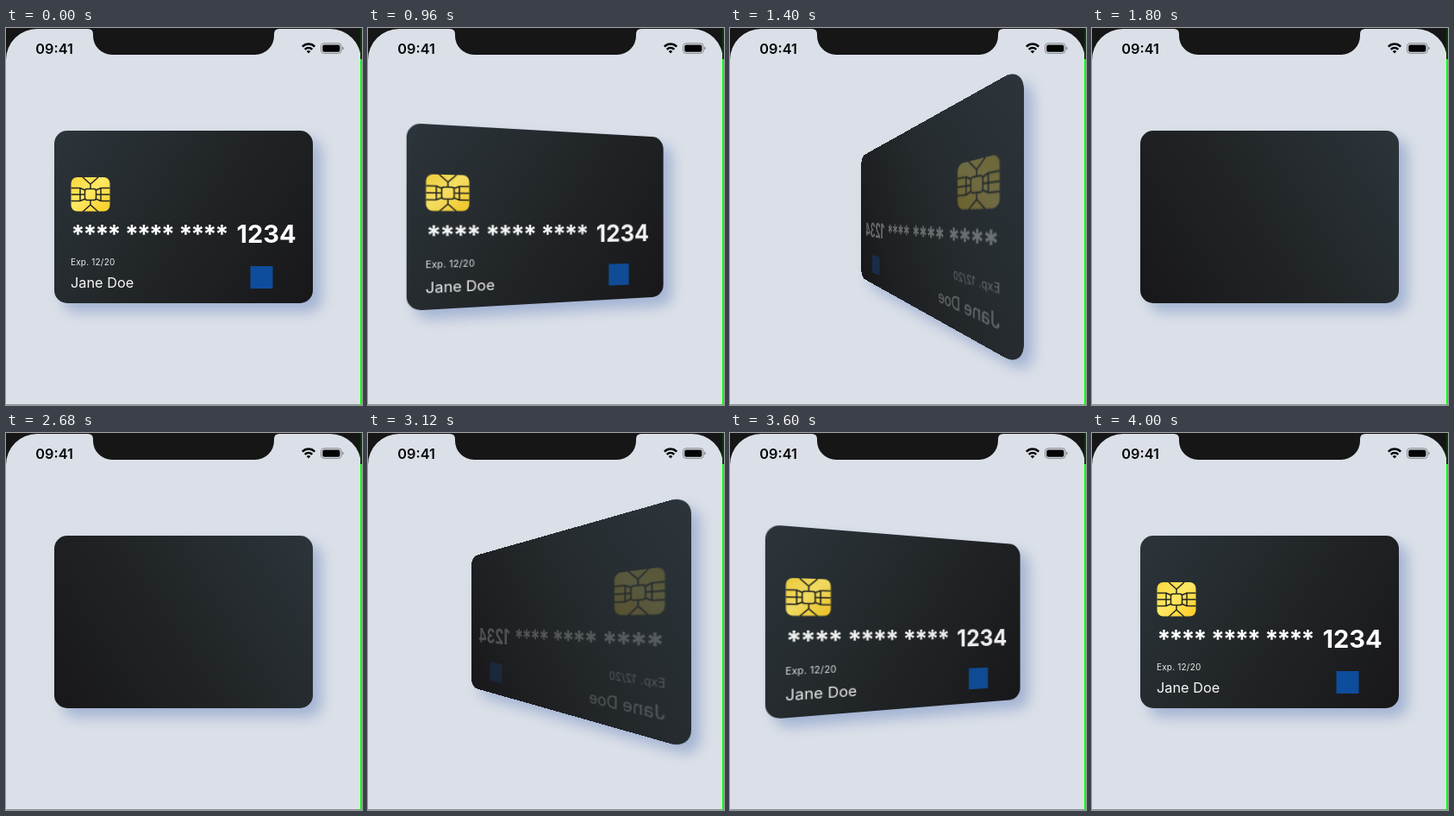
An HTML page for the animation above (4.04 s loop, 413 by 437 pixels).

```html
<!DOCTYPE html>
<html lang="en">
<head>
<meta charset="utf-8">
<title>Card flip</title>
<style>
  html, body { margin: 0; width: 100%; height: 100%; overflow: hidden; background: #dbe0e8; }
  body { position: relative; font-family: Inter, "Liberation Sans", sans-serif; }
  svg { display: block; }
  .phone { position: absolute; left: 0; top: 0; }
  .scene {
    position: absolute; left: 56px; top: 119px; width: 300px; height: 200px;
    perspective: 300px;
    filter: drop-shadow(10px 10px 8px rgba(143, 163, 203, .75));
  }
  #card { transform-origin: 50% 50%; overflow: visible; }
</style>
</head>
<body>
<svg class="phone" width="413" height="437" viewBox="0 0 413 437">
  <rect width="413" height="437" fill="#161617"/>
  <path fill="#dbe0e8" d="M0 437V37A36 36 0 0 1 36 1H95Q101 1 101 7V9A22 22 0 0 0 123 31H289A22 22 0 0 0 311 9V7Q311 1 317 1H376A36 36 0 0 1 412 37V437Z"/>
  <text x="34.3" y="29.5" font-size="16.3" font-weight="600" fill="#050506">09:41</text>

  <g fill="none" stroke="#050506" stroke-width="2.5">
    <path d="M343.8 21.6A10.2 10.2 0 0 1 358.2 21.6"/>
    <path d="M346.7 24.8A6.1 6.1 0 0 1 355.3 24.8"/>
  </g>
  <path d="M348.7 27A3.3 3.3 0 0 1 353.3 27L351 29.5Z" fill="#050506"/>

  <rect x="365.5" y="17.8" width="23.6" height="11.6" rx="3.4" fill="none" stroke="#85888e"/>
  <rect x="367.2" y="19.5" width="20.2" height="8.2" rx="1.9" fill="#050506"/>
  <path d="M390.2 21.6Q391.7 22.2 391.7 23.6T390.2 25.6Z" fill="#85888e"/>

  <rect y="436" width="413" height="1" fill="#8f9198"/>
  <rect x="411" width="2" height="36" fill="#063a0a"/>
  <rect x="411" y="36" width="2" height="401" fill="#00ff00"/>
</svg>

<div class="scene">
  <svg id="card" width="300" height="200" viewBox="0 0 300 200">
    <defs>
      <linearGradient id="skin" gradientUnits="userSpaceOnUse" x1="0" y1="0" x2="300" y2="200">
        <stop stop-color="#2c353b"/>
        <stop offset=".5" stop-color="#212527"/>
        <stop offset="1" stop-color="#18171a"/>
      </linearGradient>
      <linearGradient id="gold" x1="0" y1="0" x2="1" y2="1">
        <stop stop-color="#fbd63a"/>
        <stop offset=".45" stop-color="#ffe864"/>
        <stop offset="1" stop-color="#fbcb22"/>
      </linearGradient>
    </defs>
    <rect width="300" height="200" rx="15" fill="url(#skin)"/>
    <g id="print" fill="#fff">
      <g transform="translate(42 74)">
        <rect x="-22.5" y="-20" width="45" height="39.6" rx="7" fill="url(#gold)"/>
        <g fill="none" stroke="#25261f" stroke-width="1.5">
          <rect x="-6.5" y="-6.5" width="13" height="13" rx="2.5"/>
          <path id="half" d="M-22.5 0H-6.5M-22.5 -7.5H-12L-6 -5M-22.5 7.5H-12L-6 5M-12 -7.5V7.5M-9 -20L0 -12L9 -20M0 -12V-6.5"/>
          <use href="#half" transform="rotate(180)"/>
        </g>
      </g>
      <g id="digits" font-size="28.5" font-weight="700">
        <text x="280.5" y="130" text-anchor="end" font-size="29">1234</text>
      </g>
      <text x="19" y="155.5" font-size="10" letter-spacing=".2" fill="#ececed">Exp. 12/20</text>
      <text x="19" y="182" font-size="16.3" fill="#f8f8f8">Jane Doe</text>
      <rect x="227.5" y="157" width="26" height="26" fill="#0e4d9c"/>
    </g>
  </svg>
</div>

<script>
  const LOOP = 4040, FLIP = 1000, OPEN = 799, CLOSE = 2793;
  const card = document.getElementById("card");
  const print = document.getElementById("print");
  const digits = document.getElementById("digits");

  // Three groups of masked digits, evenly pitched
  for (const left of [19.5, 82, 144.5]) {
    const el = document.createElementNS("http://www.w3.org/2000/svg", "text");
    el.setAttribute("x", [0, 1, 2, 3].map(i => left + i * 14).join(" "));
    el.setAttribute("y", 130);
    el.textContent = "****";
    digits.append(el);
  }

  // cubic-bezier(.42, 0, .58, 1)
  function ease(x) {
    if (x <= 0) return 0;
    if (x >= 1) return 1;
    let lo = 0, hi = 1;
    for (let i = 0; i < 24; i++) {
      const u = (lo + hi) / 2, v = 1 - u;
      if (1.26 * v * v * u + 1.74 * v * u * u + u * u * u < x) lo = u;
      else hi = u;
    }
    return lo * lo * (3 - 2 * lo);
  }

  function draw(t) {
    const turn = ease((t - OPEN) / FLIP) - ease((t - CLOSE) / FLIP);
    card.style.transform = `rotateY(${(turn * 180).toFixed(3)}deg)`;
    print.setAttribute("opacity", (1 - turn).toFixed(4));
  }

  const start = performance.now();
  function tick() {
    draw((performance.now() - start) % LOOP);
    requestAnimationFrame(tick);
  }
  draw(0);
  requestAnimationFrame(tick);
</script>
</body>
</html>
```
